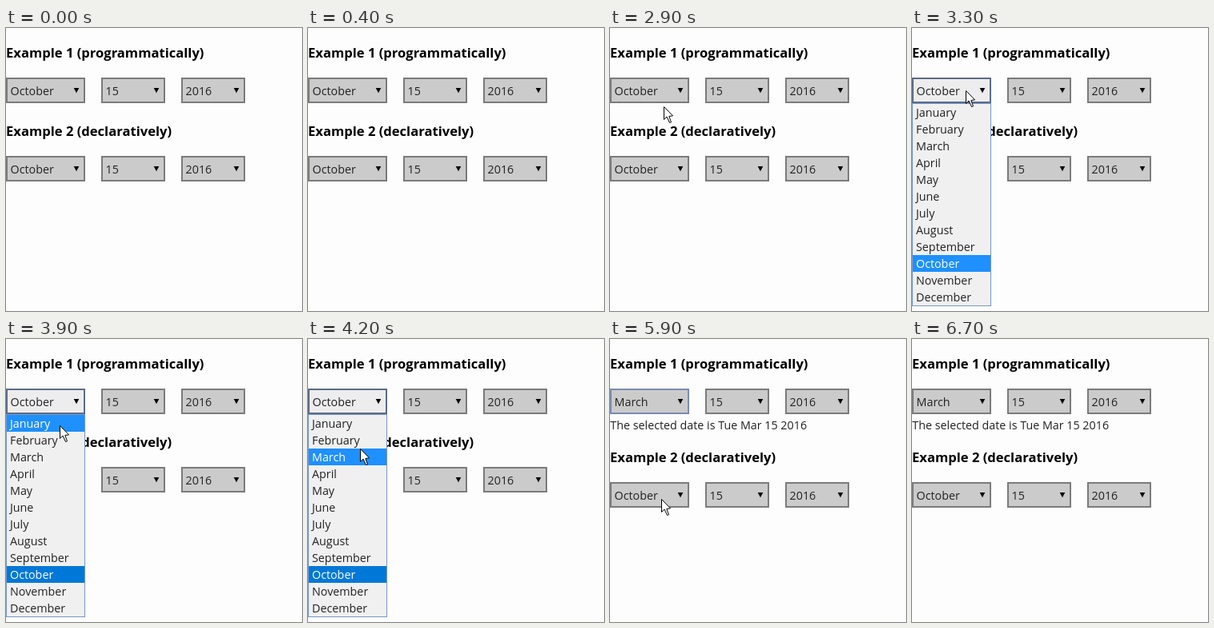
Animation of 370 by 354 pixels, one loop 6.8 s. Source, as an HTML page with a canvas:

```html
<!DOCTYPE html>
<html lang="en">
<head>
<meta charset="utf-8">
<title>Date selects</title>
<style>
  html, body { margin: 0; width: 100%; height: 100%; overflow: hidden; background: #fdfdfd; }
  canvas { display: block; }
</style>
</head>
<body>
<canvas id="stage"></canvas>
<script>
const W = 370, H = 354, LOOP = 6800, STEP = 100;
const OPEN = 3200, PICK = 4500, BLUR = 6700;
const FAMILY = '"Open Sans", "Noto Sans", sans-serif';
const TEXT = '14.3px ' + FAMILY;
const HEAD = 'bold 16.6px ' + FAMILY;
const MONTHS = ['January', 'February', 'March', 'April', 'May', 'June', 'July',
  'August', 'September', 'October', 'November', 'December'];
const LIST_TOP = 95, ROW = 21, SELECTED = 9;

// Pointer stops: time, x, y
const PATH = [
  [2200, 40, 344], [2500, 56, 240], [2800, 71, 117], [2900, 67, 98],
  [3000, 67, 78], [3500, 67, 78], [3800, 68, 98], [4200, 65, 137],
  [4300, 65, 142], [5700, 65, 142], [5900, 64, 200], [6200, 62, 354]
];
const ARROW = [[0, 0], [0, 16], [3.5, 12.5], [7, 20], [9, 19.3], [6.3, 12], [11, 11.3]];

const canvas = document.getElementById('stage');
const ctx = canvas.getContext('2d');
const dpr = window.devicePixelRatio || 1;
canvas.width = W * dpr;
canvas.height = H * dpr;
canvas.style.width = W + 'px';
canvas.style.height = H + 'px';

function rect(x, y, w, h, color) {
  ctx.fillStyle = color;
  ctx.fillRect(x, y, w, h);
}

function text(str, x, y, color = '#222', font = TEXT) {
  ctx.font = font;
  ctx.fillStyle = color;
  ctx.fillText(str, x, y);
}

function polygon(points) {
  ctx.beginPath();
  points.forEach(([x, y]) => ctx.lineTo(x, y));
  ctx.closePath();
}

function select(label, x, y, w, border = '#7b7b7b', fill = '#cbcbcb') {
  rect(x, y, w, 32, border);
  rect(x + 2, y + 2, w - 4, 28, fill);
  text(label, x + 5.6, y + 22);
  const cx = x + w - 11;
  polygon([[cx - 3.3, y + 13], [cx + 3.3, y + 13], [cx, y + 19.3]]);
  ctx.fillStyle = '#000';
  ctx.fill();
}

function example(title, y, month, border, fill) {
  text(title, 0, y + 37, '#000', HEAD);
  select(month, 0, y + 62, 99, border, fill);
  select('15', 119, y + 62, 80);
  select('2016', 219, y + 62, 80);
}

function list(pointerY) {
  rect(0, 94, 99, 254, '#7896c8');
  rect(1, LIST_TOP, 97, ROW * 12, '#f0f0f0');
  const row = Math.floor((pointerY - LIST_TOP) / ROW);
  const hover = row < 0 ? SELECTED : row;
  MONTHS.forEach((name, i) => {
    const y = LIST_TOP + i * ROW;
    const lit = i === hover || i === SELECTED;
    if (lit) rect(1, y, 97, ROW, i === hover ? '#1e90ff' : '#0078d7');
    text(name, 5, y + 16, lit ? '#fff' : '#222');
  });
}

function pointerAt(t) {
  const i = PATH.findIndex(p => p[0] > t);
  if (i < 1) return null;
  const [t0, x0, y0] = PATH[i - 1], [t1, x1, y1] = PATH[i];
  const k = (t - t0) / (t1 - t0);
  return [Math.round(x0 + (x1 - x0) * k), Math.round(y0 + (y1 - y0) * k)];
}

function pointer(x, y) {
  polygon(ARROW.map(([px, py]) => [x + px + 0.5, y + py + 0.5]));
  ctx.fillStyle = '#fff';
  ctx.fill();
  ctx.strokeStyle = '#000';
  ctx.lineWidth = 1;
  ctx.stroke();
}

function focusColor(t) {
  if (t < OPEN || t >= BLUR) return undefined;
  return t < PICK ? '#5d6c88' : '#7a8cb0';
}

function draw(t) {
  ctx.setTransform(dpr, 0, 0, dpr, 0, 0);
  rect(0, 0, W, H, '#fdfdfd');
  const pos = pointerAt(t);
  const picked = t >= PICK;
  const open = t >= OPEN && !picked;
  const hot = t >= 3000 && !picked;

  example('Example 1 (programmatically)', 0, picked ? 'March' : 'October',
    focusColor(t), hot ? '#ededed' : undefined);
  if (picked) text('The selected date is Tue Mar 15 2016', 0.3, 113);
  example('Example 2 (declaratively)', picked ? 117 : 98, 'October');
  if (open) list(pos[1]);
  if (pos) pointer(...pos);
}

const start = performance.now();
function tick() {
  const t = (performance.now() - start) % LOOP;
  draw(Math.floor(t / STEP) * STEP);
  requestAnimationFrame(tick);
}
tick();
</script>
</body>
</html>
```
